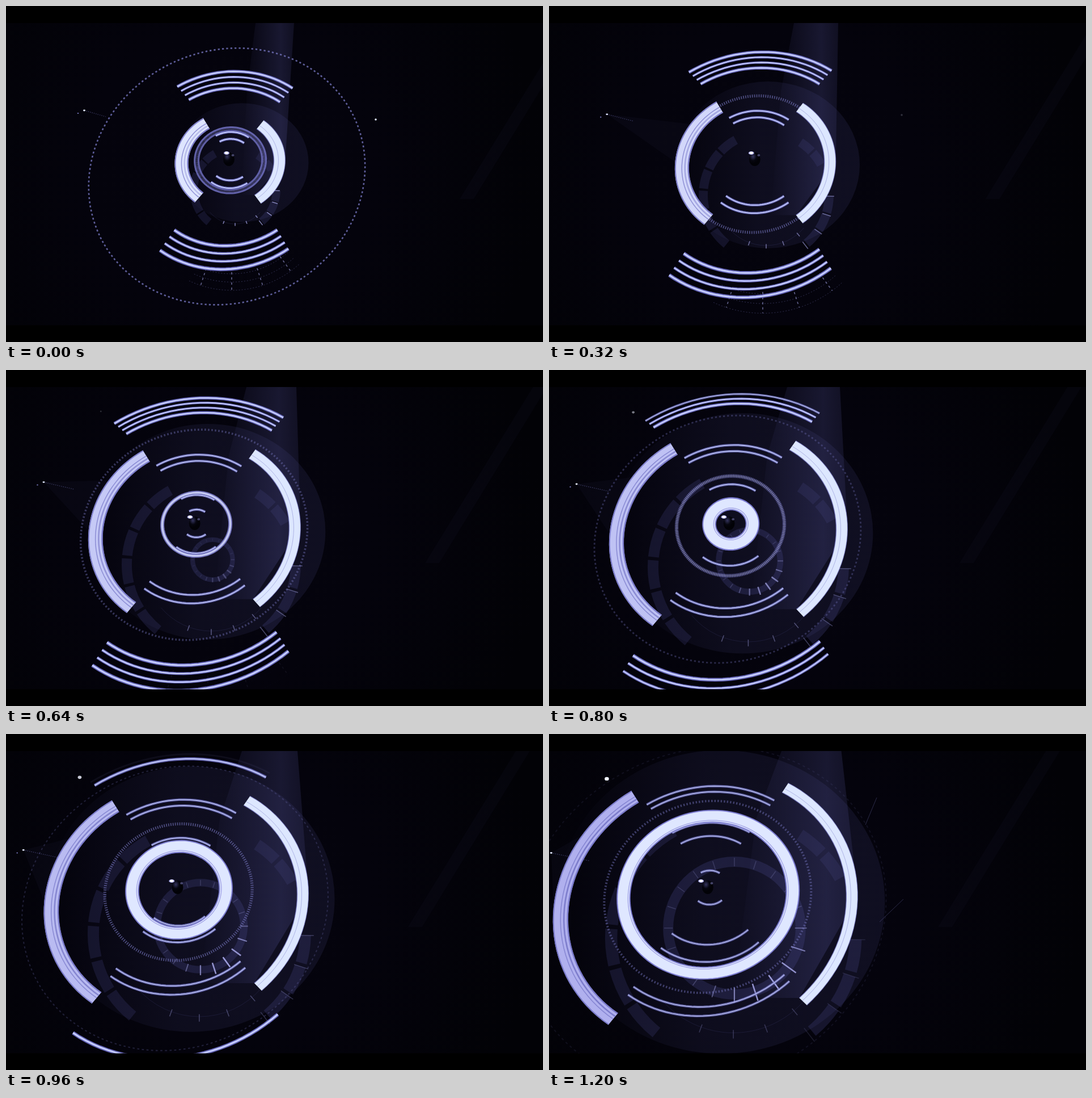
An HTML page that plays this animation: 947 px wide and 592 px high, repeating every 1.24 s.

```html
<!DOCTYPE html>
<html lang="en">
<head>
<meta charset="utf-8">
<title>Ring tunnel</title>
<style>
  html, body { margin: 0; width: 100%; height: 100%; overflow: hidden; background: #000; }
  svg { display: block; width: 100vw; height: 100vh; }
</style>
</head>
<body>
<svg viewBox="0 0 947 592">
  <defs>
    <radialGradient id="back" gradientUnits="userSpaceOnUse" cx="390" cy="290" r="560">
      <stop offset="0" stop-color="#05040e"/>
      <stop offset=".45" stop-color="#04030c"/>
      <stop offset="1" stop-color="#020206"/>
    </radialGradient>
    <linearGradient id="glow">
      <stop offset=".05" stop-color="#6464b8" stop-opacity=".01"/>
      <stop offset=".45" stop-color="#6464b8" stop-opacity=".1"/>
      <stop offset="1" stop-color="#6464b8" stop-opacity=".12"/>
    </linearGradient>
    <linearGradient id="beam">
      <stop offset="0" stop-color="#6c6cc4" stop-opacity="0"/>
      <stop offset=".75" stop-color="#6c6cc4" stop-opacity=".2"/>
      <stop offset="1" stop-color="#6c6cc4" stop-opacity=".12"/>
    </linearGradient>
    <radialGradient id="ball" cx=".35" cy=".3">
      <stop offset="0" stop-color="#34345e"/>
      <stop offset=".6" stop-color="#06060f"/>
      <stop offset="1" stop-color="#020207"/>
    </radialGradient>
    <clipPath id="window"><rect y="30" width="947" height="532.5"/></clipPath>
  </defs>
  <rect width="947" height="592"/>
  <g clip-path="url(#window)">
    <rect y="30" width="947" height="533" fill="url(#back)"/>
    <g id="scene"></g>
  </g>
</svg>
<script>
const STEP = 40, STEPS = 31;
const scene = document.getElementById('scene');

const clamp = v => Math.max(0, Math.min(1, v));
const ramp = (n, a, b) => clamp((n - a) / (b - a));
const f = v => +v.toFixed(2);
const path = pts => 'M' + pts.map(p => p.map(f).join(' ')).join('L');
const fill = (d, color, alpha = 1) => `<path d="${d}" fill="${color}" fill-rule="evenodd" opacity="${f(alpha)}"/>`;
const stroke = (d, color, width, alpha = 1, extra = '') =>
  `<path d="${d}" fill="none" stroke="${color}" stroke-width="${f(width)}" opacity="${f(alpha)}" ${extra}/>`;
const oval = (x, y, rx, ry, color, alpha = 1) =>
  `<ellipse cx="${f(x)}" cy="${f(y)}" rx="${f(rx)}" ry="${f(ry)}" fill="${color}" opacity="${f(alpha)}"/>`;

// A tunnel ring of radius r: wider rings sink, drift left and tilt.
function spot(n, r, deg, dr = 0) {
  const a = deg * Math.PI / 180, k = r + dr;
  const u = k * Math.cos(a), v = k * Math.sin(a);
  return [396 - 3.75 * n - 1.1e-4 * r * r + u, 270 + 5.1e-4 * r * r + .925 * v - 3e-4 * r * u];
}

function arc(n, r, a, b, dr = 0) {
  const count = Math.ceil((b - a) / 3);
  return Array.from({ length: count + 1 }, (_, i) => spot(n, r, a + (b - a) * i / count, dr));
}

const band = (n, r, a, b, width) =>
  path([...arc(n, r, a, b), ...arc(n, r, a, b, -width).reverse()]) + 'Z';
const hoop = (n, r, dr = 0) => path(arc(n, r, 0, 360, dr)) + 'Z';

// Angles where the four quarter arcs end.
const gates = n => ({ tl: 241, bl: 129.5, tr: -52.5 - .15 * n, br: 56 - .26 * n });
const sideRadius = n => 97.5 + 5.5 * n + .007 * n * n;

function neon(pts, width, alpha) {
  const d = path(pts);
  return stroke(d, '#6666b8', width, alpha) + stroke(d, '#c8d0ff', width * .45, alpha);
}

// Flat dials behind the tunnel: plain circles [x, y, r].
function polar([x, y, r], deg, k = 1) {
  const a = deg * Math.PI / 180;
  return [x + r * k * Math.cos(a), y + r * k * Math.sin(a)];
}

function sector(c, a, b, k = 1) {
  const r = f(c[2] * k);
  return `${path([polar(c, a, k)])}A${r} ${r} 0 0 1 ${polar(c, b, k).map(f).join(' ')}`;
}

const tick = (c, deg, k1, k2, alpha, width = 1.6, extra = '') =>
  stroke(path([polar(c, deg, k1), polar(c, deg, k2)]), '#a4a4e4', width, alpha, extra);

function lights(n) {
  const r = sideRadius(n), { tl, br } = gates(n);
  const right = spot(n, r, 0), left = spot(n, r, 185), low = spot(n, r, br, -20);
  const sx = 138 - 4.47 * n, sy = 184 + .85 * n;
  const far = 990 - n * 3.8;
  let s = fill(path([[far, 30], [far + 25, 30], [far - 165, 340], [far - 190, 340]]), '#3c3c78', .05);
  s += oval(416 - 3.75 * n, right[1] + r * .04, r + 20, r * .95 + 12, 'url(#glow)');
  s += fill(path([[440 - n, 30], [508 + n * .25, 30], right, low, [415 - 3 * n, low[1]], [425 - 2 * n, 150]]), 'url(#beam)');
  s += fill(path([[sx, sy], spot(n, r, tl - 25), left]), '#6060b0', .04 * ramp(n, 0, 8));
  s += stroke(`M${f(sx)} ${f(sy)}l${38 + n} ${f(11 + n * .1)}`, '#7070b8', 1.2, .5, 'stroke-dasharray="1.5 2"');
  s += oval(sx, sy, 2, 1.4, '#dfe5ff') + oval(sx - 11, sy + 5, 1.3, 1, '#7a7ac0');
  const glint = ramp(n, 14, 26);
  s += oval(242 - 4.67 * n, 66 + .43 * n, 1 + 2.8 * glint, 1 + 2.2 * glint, '#eef1ff', glint);
  s += oval(652 - 3.75 * n, 200 - n, 1.8, 1.8, '#dfe5ff', 1 - ramp(n, 0, 10));
  const streak = ramp(n, 26, 30) * .35;
  return s + stroke('M578 112L558 160M625 291L583 331', '#7272b8', 1, streak);
}

function dials(n) {
  let s = '';
  const big = [404 - 2.63 * n, 324 + 1.15 * n, 73 + 4.75 * n];
  const row = (from, pitch, count, alpha) => {
    for (let i = 0; i < count; i++)
      s += stroke(sector(big, from + i * pitch, from + i * pitch + pitch - 2), '#4a4a8c', 14 + n * .25, alpha);
  };
  row(129, 19, 6, .22);
  row(-57, 15, 2, .2);
  row(1, 17, 3, .26);
  for (let a = 1; a < 60; a += 17) s += tick(big, a, .94, 1.08, .75 - n * .02);

  const mid = [big[0], big[1] + 2, 58 + n * 3.6];
  for (let a = 50; a <= 110; a += 20) s += tick(mid, a, .97, 1.06, .75 - n * .016);
  s += stroke(sector(mid, 40, 140), '#5c5ca0', 1, .18);

  const fade = 1 - ramp(n, 8, 17);
  if (fade) {
    const wide = [big[0] - 6, big[1], 145 + n * 3.2];
    for (let k = 1.02; k < 1.3; k += .1)
      s += stroke(sector(wide, 48, 115, k), '#7070b4', 1, .4 * fade, 'stroke-dasharray="2 3"');
    for (let a = 54; a < 115; a += 18) s += tick(wide, a, 1, 1.22, .6 * fade, 1.6, 'stroke-dasharray="4 5"');
  }

  const m = n - 12;
  if (m >= -2) {
    const small = [375 - 2.67 * m, 332 + .55 * m, 20 + 3.4 * m + .11 * m * m];
    s += stroke(sector(small, 0, 180) + sector(small, 180, 360), '#50509a', 4 + small[2] * .12, .24 * ramp(m, -3, 1));
    for (let a = 0; a < 360; a += 18) {
      const lit = Math.max(0, Math.cos((a - 55) * Math.PI / 180)) ** 2;
      s += tick(small, a, .93 - .05 * lit, 1.06 + .1 * lit, (.2 + .75 * lit) * ramp(m, 1, 10), 1.6 + lit);
    }
  }
  return s;
}

// Toothed rings start as bright hoops and thin out as they grow.
function rings(n) {
  let s = '';
  for (const delay of [-21, 0, 16]) {
    const r = 60 + 8.75 * (n - delay);
    if (r < 5) continue;
    const alpha = delay < 0 ? .8 - n * .18 : .95 - r * .0026;
    if (alpha > 0)
      s += stroke(hoop(n, r), '#7474bc', Math.max(2, 8 - r * .022), alpha, 'pathLength="400" stroke-dasharray=".9 1.1"');
    const solid = 1 - ramp(r, 50, 105);
    if (!solid) continue;
    if (delay) s += stroke(hoop(n, r), '#7c7ccc', 7, solid) + stroke(hoop(n, r), '#d8deff', 3.5, solid);
    else s += stroke(hoop(n, r, 3) + hoop(n, r, -4), '#7070c0', 3, solid);
  }
  return s;
}

function innerArcs(n) {
  const { tl, bl, tr, br } = gates(n);
  let s = '';
  for (const gap of [0, 14, 86, 115, 186]) {
    const r = 53.5 + 5.5 * n - gap;
    if (r < 18) continue;
    const alpha = .95 - n * .008;
    s += neon(arc(n, r, tl, 360 + tr), 4.5, alpha) + neon(arc(n, r, br, bl), 4.5, alpha);
  }
  return s;
}

// Four lines above and below, each fading near the edge of the window.
function stacks(n) {
  const { tl, bl, tr, br } = gates(n);
  let s = '';
  for (let i = 0; i < 4; i++) {
    const width = i % 3 ? 4 : 5.5;
    const up = arc(n, 147 + 5.95 * n + 13 * i, tl, 360 + tr);
    const down = arc(n, 152 + 5.4 * n + 12.5 * i, br, bl);
    const crest = Math.min(...up.map(p => p[1]));
    const upAlpha = clamp((crest - 35) / 10), downAlpha = clamp((540 - down.at(-1)[1]) / 10);
    if (upAlpha) s += neon(up, width, upAlpha);
    if (downAlpha) s += neon(down, width + 1, downAlpha);
  }
  return s;
}

function brackets(n) {
  const { tl, bl, tr, br } = gates(n);
  const r = sideRadius(n), k = n / 30, w = 24 + 3 * k;
  const tint = `rgb(${f(222 - 46 * k)},${f(229 - 53 * k)},${f(255 - 17 * k)})`;
  const groove = (a, b, dr, width, alpha) => stroke(path(arc(n, r, a, b, dr)), '#7474c6', width, alpha);
  return fill(band(n, r, bl, tl, w), tint) +
    groove(bl, tl, -1, 2, .9) + groove(bl, tl, -w * .5, 1.5, .7) +
    groove(bl, tl, -w * .72, 2.5, .35 + .5 * k) + groove(bl, tl, 1 - w, 2.5, .9) +
    fill(band(n, r, tr, br, 20), '#dde7ff') +
    groove(tr, br, 0, 1.2, .6) + groove(tr, br, -12, 1, .45) + groove(tr, br, -20, 1.5, .6);
}

function core(n) {
  let s = '';
  const r = 49.5 + 11.1 * (n - 20);
  if (r > 10) {
    const hole = -Math.min(22.5, r - 2);
    s += fill(hoop(n, r) + hoop(n, r, hole), '#dfe7ff');
    s += stroke(hoop(n, r) + hoop(n, r, hole), '#7c7cd0', 2);
    s += stroke(hoop(n, r, hole * .85), '#9c9ce4', 1.5, .8);
  }
  const x = 393 - 3.77 * n, hx = 389 - 4.03 * n;
  s += oval(x, 270, 10, 12, 'url(#ball)') + oval(x + 7, 263, 2.5, 2, '#8484c4', .5);
  return s + oval(hx, 259, 5, 3, '#a8a8e4') + oval(hx, 258.8, 3.2, 2, '#fff');
}

const layers = [lights, dials, rings, innerArcs, stacks, brackets, core];
const start = performance.now();
let last = -1;

function run() {
  const n = Math.floor((performance.now() - start) / STEP) % STEPS;
  if (n !== last) scene.innerHTML = layers.map(layer => layer(n)).join('');
  last = n;
  requestAnimationFrame(run);
}
run();
</script>
</body>
</html>
```
